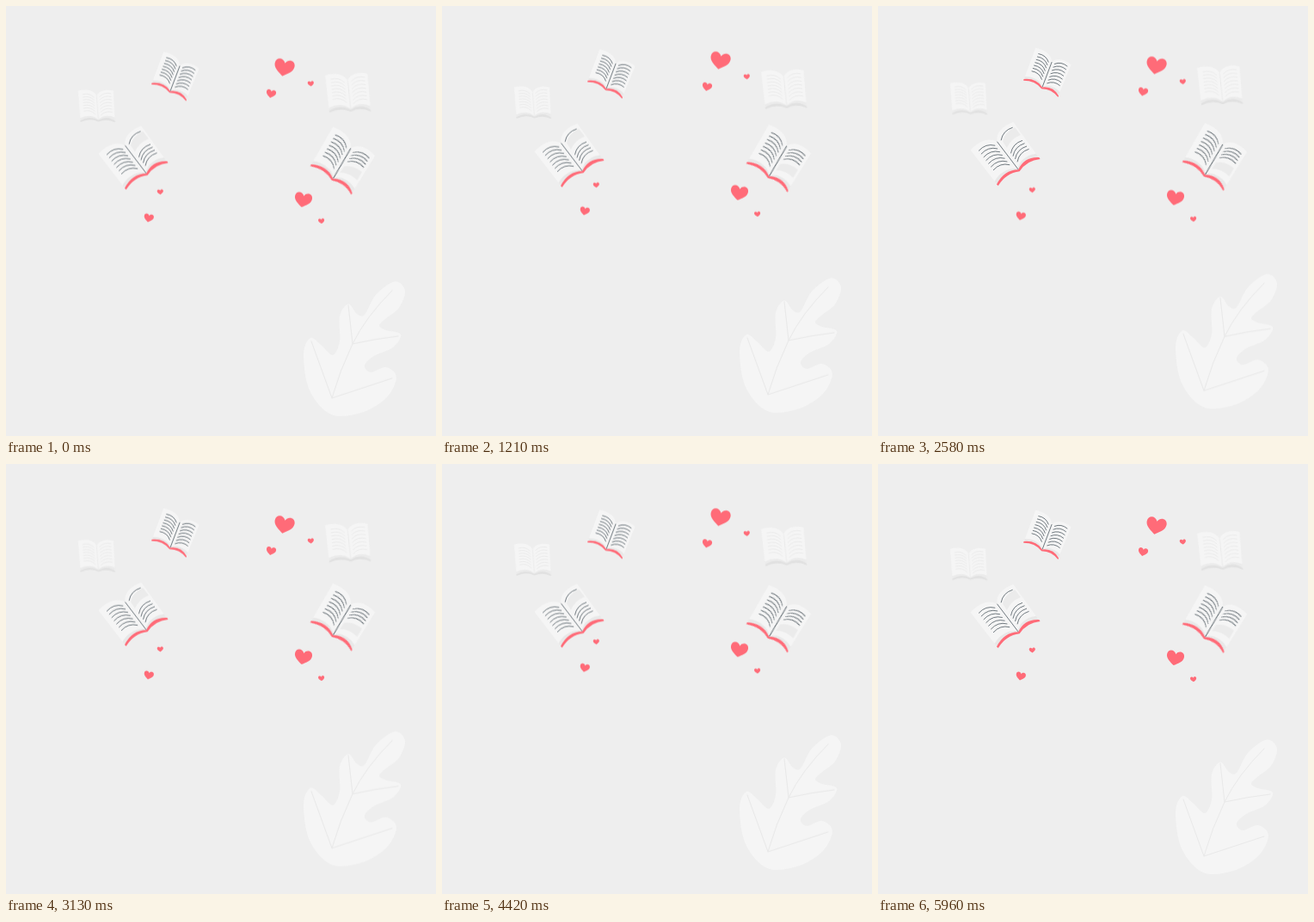
Write an HTML page that moves like this. It is 500 px wide and 500 px high and loops after 6 s.

```html
<!DOCTYPE html>
<html lang="en">
<head>
<meta charset="utf-8">
<title>Floating books</title>
<style>
  html, body { margin: 0; width: 100%; height: 100%; overflow: hidden; background: #eee; }
  svg { display: block; width: 100vw; height: 100vh; }
  .bob { animation: bob 6s linear -40ms infinite; }
  .hearts { animation-duration: 3s; fill: #ff6b78; }
  .books { animation-duration: 1.5s; }
  .pale { --ink: #e8e8e8; --cover: #e1e1e1; --side: #ebebeb; }
  .books { --ink: #455058; --cover: #ff6b78; --side: #e8e8e8; }
  .leaf, .page { fill: #f5f5f5; }
  .side { fill: var(--side); }
  .photo { fill: #ebebeb; }
  .cover { fill: var(--cover); }
  .text { fill: none; stroke: var(--ink); stroke-width: .75; vector-effect: non-scaling-stroke; }
  .vein { fill: none; stroke: #e9e9e9; stroke-linecap: round; }
  @keyframes bob { 50% { transform: translateY(-10px); } }
</style>
</head>
<body>
<svg viewBox="0 0 500 500">
  <g class="bob pale" id="pale"></g>
  <g class="bob books" id="books"></g>
  <g class="bob hearts" id="hearts"></g>
</svg>
<script>
  const NS = 'http://www.w3.org/2000/svg';

  function add(parent, tag, attrs) {
    const el = document.createElementNS(NS, tag);
    for (const key in attrs) el.setAttribute(key, attrs[key]);
    return parent.appendChild(el);
  }

  const layer = id => document.getElementById(id);

  const group = (id, x, y, turn, scale) =>
    add(layer(id), 'g', { transform: `translate(${x} ${y}) rotate(${turn}) scale(${scale})` });

  // Closed smooth curve through the given points.
  function blob(points) {
    const at = i => points[(i + points.length) % points.length];
    const lean = (i, sign) =>
      at(i).map((v, k) => v + sign * (at(i + 1)[k] - at(i - 1)[k]) / 6);
    return points.reduce((d, p, i) =>
      `${d}C${lean(i, 1)} ${lean(i + 1, -1)} ${at(i + 1)}`, `M${points[0]}`) + 'Z';
  }

  // Rows of text on one page; dir is -1 for left, 1 for right.
  function rows(dir, top, count, pitch) {
    let d = '';
    for (let i = 0; i < count; i++) {
      const y = top + i * pitch;
      d += `M${y * .07 + dir * 3.5} ${y}q${dir * 6} -6.5 ${dir * 15} -4`;
    }
    return d;
  }

  // Origin is the foot of the spine; photo is '', 'top' or 'bottom' of the right page.
  function book(id, x, y, turn, scale, photo = '') {
    const g = group(id, x, y, turn, scale);
    const path = (name, d) => add(g, 'path', { class: name, d });
    path('side', 'M-23.5 -7L-23 0Q-11 -7 0 0Q11 -7 21 0L21 -7L0 -6Z');
    path('page', 'M-2.3 -32.5C-7 -41 -17 -41.5 -26.3 -39.2L-23.5 -4Q-10 -10.5 0 -2Z');
    path('page', 'M-2.3 -32.5C1 -40 10 -41.5 19.3 -39.2L21 -4.5Q9 -10.5 0 -2Z');
    path('cover', 'M-23.5 -.6Q-11 -8 0 -1.2Q11 -8 21.5 -.2L21.5 1.6Q11 -4 0 .8Q-11 -4.5 -23 1.2Z');

    let right = rows(1, -31.5, 7, 4);
    if (photo === 'top') right = rows(1, -31.5, 1, 0) + rows(1, -17, 4, 3.2);
    if (photo === 'bottom') right = rows(1, -30.5, 4, 3.2);
    if (photo) path('photo', `M2 ${photo === 'top' ? -23 : -9}v-7q7 -6 16 -4.5l.6 8.5q-9 -2 -16.6 3z`);
    path('text', 'M-2.3 -32.5L0 -1.5' + rows(-1, -30.5, 7, 3.6) + right);
  }

  add(layer('pale'), 'path', {
    class: 'leaf',
    d: blob([
      [452, 320.5], [464, 331], [457, 351], [441, 364], [434, 372], [442, 377], [459, 382],
      [450, 397], [428, 407], [417, 418], [424, 426], [442, 420], [454, 432], [442, 456],
      [413, 473], [378, 475], [353, 447], [346, 405], [354, 386], [366, 394], [380, 406],
      [388, 390], [388, 361], [398, 346.5], [408, 358], [417, 359], [430, 336]
    ])
  });
  add(layer('pale'), 'path', {
    class: 'vein',
    d: 'M355 390L379 456L449 433M379 456Q388 424 403 393T449 331M398 348L403 393Q430 387 456 384'
  });

  book('pale', 107.5, 134, 0, .9);
  book('pale', 401, 122, -2, 1.08);
  book('books', 190.5, 100.5, 25, 1);
  book('books', 164, 196.5, -33, 1.3, 'top');
  book('books', 379.5, 202.5, 34.5, 1.3, 'bottom');

  const heart = 'M0 10.2C-5 6.5 -12 3 -12 -3.5C-12 -11 -3 -12 0 -5.5C3 -12 12 -11 12 -3.5C12 3 5 6.5 0 10.2Z';
  const [big, small, tiny] = [.97, .47, .3];
  [
    [323.4, 72, big], [308.2, 102.3, small], [354.4, 90.5, tiny], [345.4, 225.7, big * .87],
    [366.7, 250.3, tiny], [179.4, 216.5, tiny], [166, 246.7, small]
  ].forEach(([x, y, size]) =>
    add(group('hearts', x, y, size > tiny ? 12 : -5, size), 'path', { d: heart }));
</script>
</body>
</html>
```
